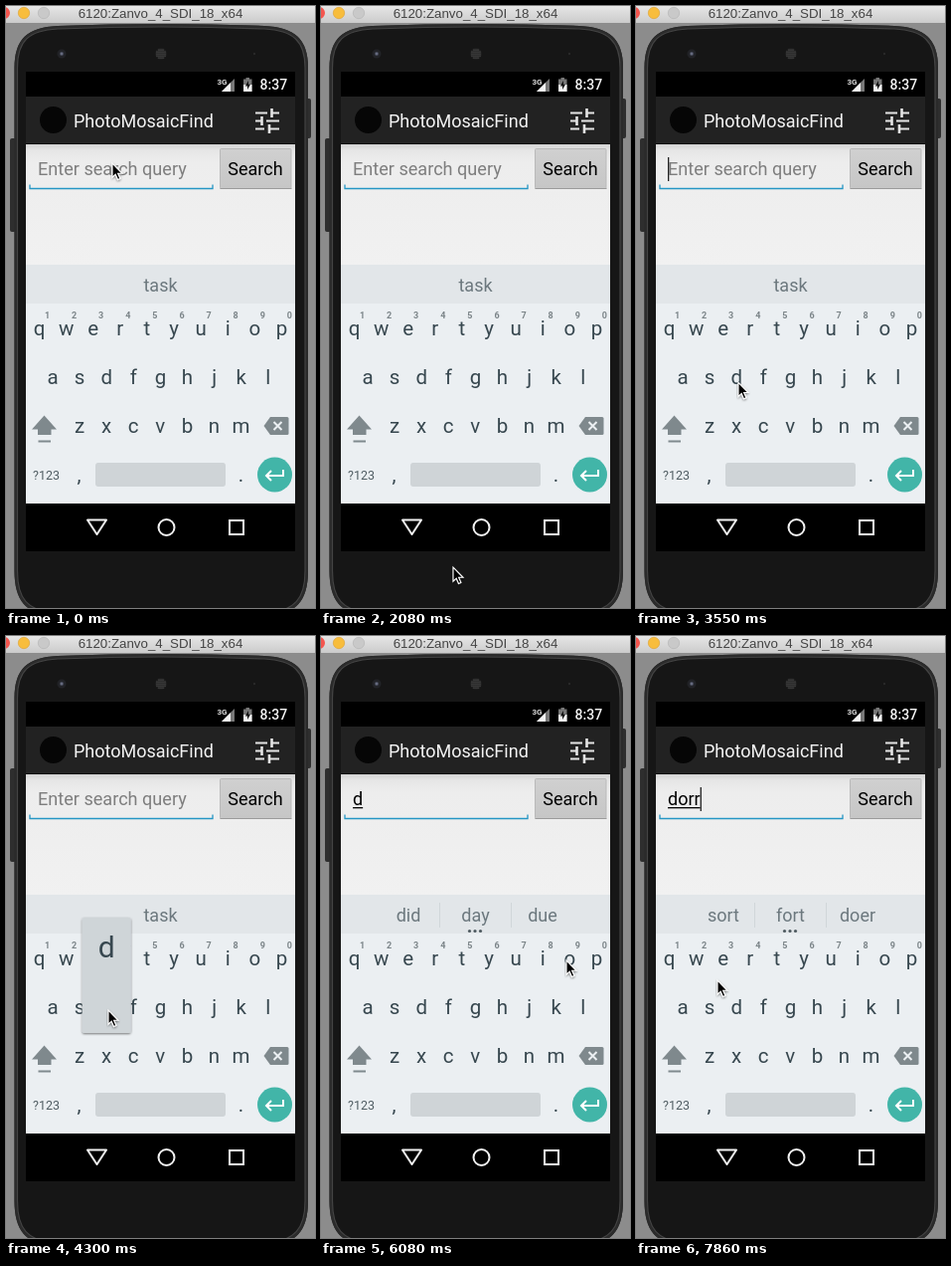
Recreate the animation shown at these times as an HTML page. Size 311 px wide and 605 px high, loop 8000 ms.

```html
<!DOCTYPE html>
<html lang="en">
<head>
<meta charset="utf-8">
<title>Typing a search query</title>
<style>
html, body { margin: 0; width: 100%; height: 100%; overflow: hidden; background: #8c8c8c; }
svg { display: block; width: 311px; height: 605px; font-family: Roboto, sans-serif; }
.mid { text-anchor: middle; }
.key { font-size: 20.5px; fill: #37474f; }
.hint { font-size: 9px; font-weight: 700; fill: #7b8488; }
.sug { font-size: 18px; fill: #6c787e; }
</style>
</head>
<body>
<svg viewBox="0 0 311 605">
  <defs>
    <linearGradient id="bar" x2="0" y2="1"><stop stop-color="#e6e6e6"/><stop offset="1" stop-color="#cbcbcb"/></linearGradient>
    <linearGradient id="page" x2="0" y2="1"><stop stop-color="#d2d2d2"/><stop offset=".05" stop-color="#e6e6e6"/><stop offset=".15" stop-color="#ededed"/><stop offset="1" stop-color="#f1f1f1"/></linearGradient>
    <linearGradient id="btn" x2="0" y2="1"><stop stop-color="#d0d0d0"/><stop offset="1" stop-color="#c6c6c6"/></linearGradient>
    <filter id="soft" x="-20%" y="-20%" width="140%" height="140%"><feDropShadow dx="0" dy="1" stdDeviation="1" flood-opacity=".5"/></filter>
  </defs>

  <!-- window -->
  <rect width="311" height="605" fill="#8c8c8c"/>
  <rect width="311" height="17" fill="url(#bar)"/>
  <circle cx="-2" cy="7" r="6" fill="#f4564f"/>
  <circle cx="18" cy="7" r="5.700" fill="#f8bd3c" stroke="#dda02c" stroke-width=".6"/>
  <circle cx="38" cy="7" r="5.700" fill="#c9c9c9" stroke="#b3b3b3" stroke-width=".6"/>
  <text class="mid" x="155.500" y="12" font-size="13.300" fill="#444" style="font-family:'Liberation Sans',sans-serif">6120:Zanvo_4_SDI_18_x64</text>

  <!-- phone -->
  <rect x="4" y="133" width="6" height="94" rx="2" fill="#2e2e2e"/>
  <rect x="302" y="93" width="5" height="40" rx="2" fill="#2e2e2e"/>
  <g id="body">
    <path id="shell" d="M10 62C10 34 22 23 52 21.500Q156 17.500 260 21.500C290 23 302.500 34 302.500 62V568C302.500 596 292 610 262 612H50C20 610 10 596 10 568Z" fill="#161616" stroke="#2a2a2a" stroke-width="3"/>
    <use href="#shell" fill="none"/>
    <path d="M11.500 62C11.500 35 23 24.500 52 23Q156 19 260 23C289 24.500 301 35 301 62V568C301 595 291 608 262 610H50C21 608 11.500 595 11.500 568Z" fill="none" stroke="#434343" stroke-width="1.200"/>
  </g>
  <circle cx="56" cy="48" r="4.500" fill="#222327"/>
  <circle cx="56" cy="48" r="2" fill="#484d5e"/>
  <circle cx="56" cy="48" r=".8" fill="#8d93aa"/>
  <circle cx="156" cy="48" r="6" fill="#1e1e1e"/>
  <g id="speaker" fill="#777"></g>
  <circle cx="250" cy="48" r="1.200" fill="#292929"/>
  <rect x="20" y="66" width="271" height="482" fill="#000"/>

  <!-- status bar -->
  <text x="212.500" y="79" font-size="8" font-weight="700" fill="#ddd">3G</text>
  <path d="M230 73V86H217Z" fill="#777"/>
  <path d="M226 77V86H217Z" fill="#f2f2f2"/>
  <path d="M241.500 72H245V73.500H247.500V86H239V73.500H241.500Z" fill="#777"/>
  <path d="M239 79H247.500V86H239Z" fill="#f2f2f2"/>
  <path d="M244 75L240.800 80.500H243V84L246 78.800H244Z" fill="#111"/>
  <text x="255.500" y="84" font-size="14" font-weight="500" fill="#f4f4f4">8:37</text>

  <!-- action bar -->
  <rect x="20" y="91" width="271" height="47" fill="#222"/>
  <circle cx="47.500" cy="114.500" r="13.500" fill="#060606"/>
  <text x="68" y="122" font-size="18" fill="#f4f4f4">PhotoMosaicFind</text>
  <path d="M251 107.500H263M268 107.500H275M251 115.500H257M262 115.500H275M251 123.500H260M265 123.500H275" stroke="#e4e4e4" stroke-width="2.200"/>
  <path d="M267.500 103V112M257.500 111V120M265 119V128" stroke="#e4e4e4" stroke-width="2.600"/>

  <!-- form -->
  <rect x="20" y="139" width="271" height="121" fill="url(#page)"/>
  <path d="M20 138.500H291" stroke="#0c0c0c"/>
  <path d="M24 179.500V183.500H208V179.500" fill="none" stroke="#2596c4" stroke-width="1.300"/>
  <rect x="215.500" y="143.500" width="71.500" height="40" rx="1" fill="url(#btn)" stroke="#b9b9b9"/>
  <path d="M215.500 183.500H287.500" stroke="#9b9b9b"/>
  <text class="mid" x="251" y="170" font-size="18">Search</text>
  <text id="hint" x="32" y="170" font-size="18.100" fill="#7e7e7e">Enter search query</text>
  <text id="query" x="32" y="170" font-size="18"></text>
  <rect id="line" x="32" y="172" height="1.300"/>
  <rect id="caret" y="152" width="1.300" height="24" fill="#222"/>

  <!-- keyboard -->
  <rect x="20" y="260" width="271" height="39" fill="#e2e6e9"/>
  <rect x="20" y="299" width="271" height="201" fill="#ebeff2"/>
  <g id="more">
    <path d="M119.500 268V293M191.500 268V293" stroke="#d0d6d9"/>
    <g fill="#4e5a60"><circle cx="149.500" cy="296.500" r="1.600"/><circle cx="155" cy="296.500" r="1.600"/><circle cx="160.500" cy="296.500" r="1.600"/></g>
  </g>
  <g id="words"></g>
  <g id="keys"></g>
  <path d="M38.500 411.500L51 425.500H45.500V431H32V425.500H26ZM32.500 436.500H45V438.500H32.500Z" fill="#7f898d"/>
  <path d="M266 413H283Q284.500 413 284.500 414.500V429.500Q284.500 431 283 431H266L259.500 422Z" fill="#7f898d"/>
  <path d="M269.500 418L277.500 426M277.500 418L269.500 426" stroke="#ebeff2" stroke-width="2"/>
  <text class="mid" x="40.500" y="476" font-size="12.500" fill="#4f5c62">?123</text>
  <rect x="90" y="459" width="131" height="24" rx="3" fill="#cfd4d7"/>
  <circle cx="270.500" cy="471" r="17.500" fill="#42b5a8"/>
  <path d="M279 466V472H262.500M267 467L262 472L267 477" fill="none" stroke="#fff" stroke-width="2"/>
  <g id="popup">
    <rect x="-24.500" y="-97" width="49" height="116" rx="2" fill="#cfd5d8" filter="url(#soft)"/>
    <text class="mid" y="-57" font-size="30" fill="#37474f"></text>
  </g>

  <!-- navigation -->
  <g fill="none" stroke="#f2f2f2" stroke-width="2">
    <path d="M82 516.500H101L91.500 531Z" stroke-linejoin="round"/>
    <circle cx="161.500" cy="524" r="8"/>
    <rect x="225" y="517" width="14" height="14"/>
  </g>

  <path id="mouse" d="M1 1V15.200L4.200 12.200L6.500 17.500L8.900 16.500L6.600 11.300H11Z" fill="#000" stroke="#fff" stroke-width="1.100" filter="url(#soft)"/>
</svg>
<script>
const LOOP = 8000, START = 300, STEP = 148.2;
const $ = id => document.getElementById(id);

function add(parent, tag, attrs, text) {
  const el = document.createElementNS('http://www.w3.org/2000/svg', tag);
  for (const name in attrs) el.setAttribute(name, attrs[name]);
  if (text) el.textContent = text;
  return parent.appendChild(el);
}

const keyAt = {};
function addRow(letters, x, y) {
  [...letters].forEach((ch, i) => {
    keyAt[ch] = [x + i * 27.1, y];
    add($('keys'), 'text', { class: 'mid key', x: x + i * 27.1, y }, ch);
  });
}
addRow('qwertyuiop', 33.5, 331);
addRow('asdfghjkl', 47, 380);
addRow('zxcvbnm', 74, 429);
addRow(',', 73.5, 478);
addRow('.', 236.5, 478);
for (let i = 0; i < 10; i++)
  add($('keys'), 'text', { class: 'mid hint', x: 41.5 + i * 27.1, y: 313.5 }, String((i + 1) % 10));

for (let x = -4; x <= 4; x += 2)
  for (let y = -4; y <= 4; y += 2)
    if (x * x + y * y < 25) add($('speaker'), 'circle', { cx: 156 + x, cy: 48 + y, r: 0.6 });

const words = [88, 155.5, 223].map(x => add($('words'), 'text', { class: 'mid sug', x, y: 287 }));

// Pointer stops: step, x, y
const route = [
  [-1, 106, 157], [3, 58, 174], [6, 58, 174], [7, 262, 330], [8, 226, 462], [9, 147, 516],
  [11, 147, 516], [12, 132, 563], [17, 113, 399], [19, 102, 384], [23, 102, 375],
  [30, 102, 375], [34, 198, 333], [38, 246, 325], [41, 246, 325], [42, 139, 329],
  [45, 113, 325], [50, 113, 325], [51, 81, 345], [60, 81, 345]
];
// Step, text in the field, suggestions
const typed = [
  [-1, '', ['', 'task', '']],
  [28, 'd', ['did', 'day', 'due']],
  [41, 'do', ["don't", 'so', 'of']],
  [48, 'dor', ['for', 'door', 'dot']],
  [50, 'dorr', ['sort', 'fort', 'doer']]
];
const presses = [[27, 29, 'd'], [40, 42, 'o'], [47, 48, 'r'], [49, 50, 'r']];
const blinks = [[0, 3], [13, 17], [20, 23], [28, 31], [35, 38], [41, 44], [48, 60]];

const during = (step, [from, to]) => step >= from && step < to;
const show = (el, on) => el.setAttribute('visibility', on ? 'visible' : 'hidden');
const move = (el, x, y) => el.setAttribute('transform', `translate(${x} ${y})`);

function pointer(step) {
  const i = route.findIndex(stop => stop[0] > step);
  const [s0, x0, y0] = route[i - 1], [s1, x1, y1] = route[i];
  const p = (step - s0) / (s1 - s0);
  return [x0 + (x1 - x0) * p, y0 + (y1 - y0) * p];
}

function draw(time) {
  const step = Math.max(-1, Math.floor((time - START) / STEP + 0.07));
  const [, text, list] = typed.filter(entry => entry[0] <= step).pop();
  const query = $('query');
  query.textContent = text;
  const width = text ? query.getComputedTextLength() : 0;
  $('line').setAttribute('width', width);
  $('caret').setAttribute('x', 32 + width);
  show($('hint'), !text);
  show($('caret'), blinks.some(span => during(step, span)));
  show($('more'), text);
  words.forEach((el, i) => { el.textContent = list[i]; });

  const press = presses.find(span => during(step, span));
  const popup = $('popup');
  show(popup, press);
  if (press) {
    move(popup, ...keyAt[press[2]]);
    popup.lastElementChild.textContent = press[2];
  }
  move($('mouse'), ...pointer(step));
}

const begin = performance.now();
function tick() {
  draw((performance.now() - begin) % LOOP);
  requestAnimationFrame(tick);
}
tick();
</script>
</body>
</html>
```
